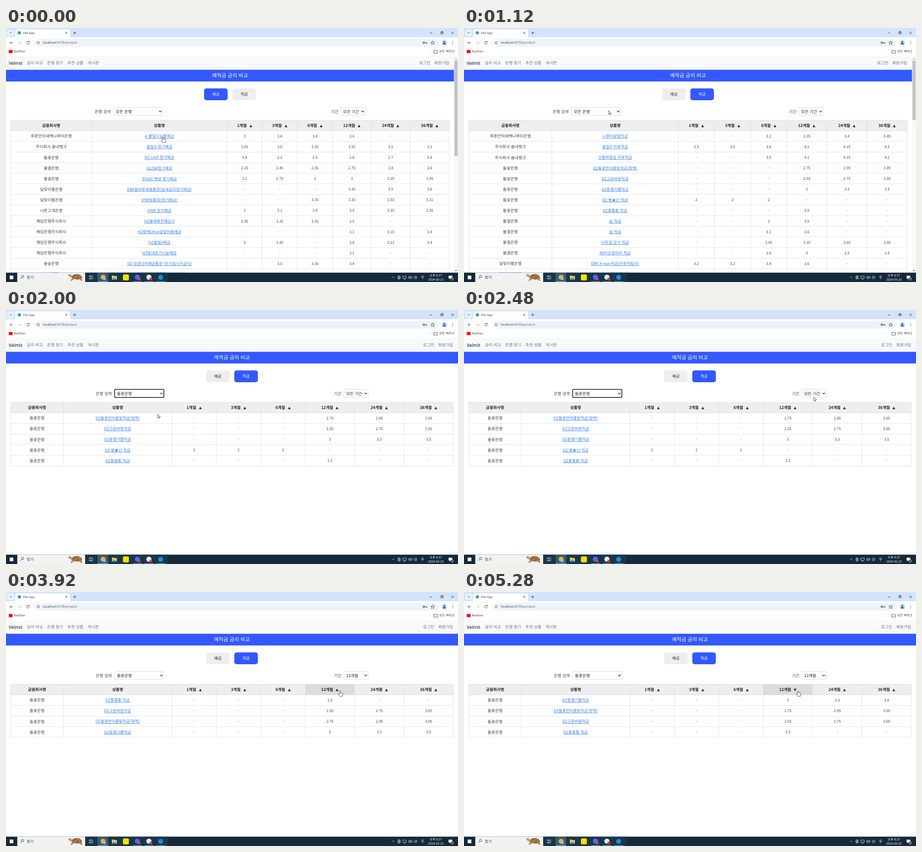
An HTML page that plays this animation: 982 by 552 pixels, repeating every 5360 ms.

```html
<!DOCTYPE html>
<html lang="ko">
<head>
<meta charset="utf-8">
<title>예적금 금리 비교</title>
<style>
html, body { margin: 0; width: 100%; height: 100%; overflow: hidden; background: #fff; }
svg { display: block; width: 982px; height: 552px; }
text { font-family: "Noto Sans CJK KR", "Noto Sans", sans-serif; text-rendering: geometricPrecision; white-space: pre; }
.ui { font-family: "Noto Sans", "Noto Sans CJK KR", sans-serif; }
.link { text-decoration: underline; text-decoration-thickness: .6px; }
.line { fill: none; stroke: #444; stroke-width: 1; }
</style>
</head>
<body>
<svg viewBox="0 0 982 552">
  <defs><clipPath id="view"><rect y="61" width="982" height="471"/></clipPath></defs>
  <g id="browser"></g>
  <g id="page" clip-path="url(#view)"></g>
  <g id="taskbar"></g>
  <g id="cursor"></g>
</svg>
<script>
const LOOP = 5360, ROW = 23.05, TOP = 200.5, ITEM = 11.27, LIST_TOP = 190.7;
const BLUE = '#3358ff', LINK = '#2f7bea';
const $ = id => document.getElementById(id);

const banks = ('모든 은행,푸른언덕새벽나루터은행,주식회사 솔내뱅크,들꽃은행,물결은행,달맞이별은행,너른고개은행,솔숲은행,' +
  '주식회사 도토리뱅크,해담은행주식회사,윤슬뱅크 주식회사,갯돌은행,참빛은행,여울은행,구름은행,안개은행,노을은행,이슬은행,버들은행').split(',');
const months = ['1개월', '3개월', '6개월', '12개월', '24개월', '36개월'];
const periods = ['모든 기간', ...months];

const parse = list => list.trim().split('\n').map(line => {
  const [bank, name, rates] = line.split('|');
  return { bank: banks[bank], name, rates: rates.split(' ') };
});

const deposits = parse(`
1|e-풀잎디딤돌예금|3 3.4 3.4 3.4 - -
2|솔잎Q 정기예금|3.05 3.5 3.55 3.55 3.2 3.2
3|DZ Leaf 정기예금|1.8 2.2 2.3 2.6 2.7 2.8
4|GLOW정기예금|2.25 2.45 2.55 2.75 2.8 2.8
4|온(All) 햇살 정기예금|2.2 2.75 3 3 3.25 1.95
5|DBY들마루새봄통장(실세금리정기예금)|- - - 3.45 3.5 3.6
5|3색9빛통장(정기예금)|- - 3.33 3.33 3.33 3.31
6|QNR 정기예금|3 3.1 3.4 3.5 3.35 3.35
9|HZ물레회전예금 II|2.95 3.35 3.35 3.5 - -
9|HZ함께Olive갈잎마을예금|- - - 3.1 3.15 3.4
9|HZ봄빛e예금|3 3.45 - 3.6 3.23 3.4
9|HZ동네온기나눔예금|- - - 3.1 - -
7|SQ 징검다리예금통장 (만기일시지급식)|- 3.5 3.55 3.4 - -
7|SQ 징검다리예금통장 (이자지급식)|- - - 3.4 - -`);

const savings = parse(`
1|나루터살림적금|- - 3.1 3.35 3.4 3.45
2|솔잎Q 자유적금|3.3 3.5 3.6 4.2 4.25 4.3
2|산들바람길 자유적금|- - 3.5 4.1 4.15 4.2
3|DZ들꽃한아름빛적금(정액)|- - - 2.75 2.95 3.05
3|DZ고운바람적금|- - - 2.55 2.75 3.05
3|DZ동행기쁨적금|- - - 3 3.3 3.5
3|DZ 별★난 적금|2 2 2 - - -
3|DZ통통통 적금|- - - 2.5 - -
4|숲 적금|- - 3 3.5 - -
4|숲 적금|- - 3.1 3.6 - -
4|나무길 걷기 적금|- - 3.05 3.35 3.05 3.05
4|MQY손길따라 적금|- - 2.9 3 2.5 2.5
5|DBY A-way적금(자유적립식)|3.2 3.2 3.4 3.6 - -
5|DBY A-way적금(정액적립식)|3.2 3.2 3.4 3.6 - -`);

const columns = {
  deposit: [10.5, 186, 480.5, 556.5, 633, 709.5, 793.5, 878, 963],
  saving: [10.5, 191, 465.5, 544, 623, 701, 788.5, 875.5, 963],
  filtered: [10.5, 124.5, 360.5, 457, 553.5, 650.5, 757, 865, 971.5]
};

// Pointer tip: time, x, y
const path = [[0, 341.5, 237], [80, 341.5, 237], [560, 506, 150], [820, 506, 150], [1200, 290, 183],
  [1360, 290, 183], [1540, 288, 205], [1640, 288, 205], [1780, 286, 230], [1900, 286, 230],
  [2440, 760, 189], [2520, 760, 189], [2600, 759, 184], [2720, 759, 184], [2960, 758, 242],
  [3160, 758, 242], [3600, 726, 215], [LOOP, 726, 215]];

const rect = (x, y, w, h, fill, more = '') => `<rect x="${x}" y="${y}" width="${w}" height="${h}" fill="${fill}" ${more}/>`;
const circle = (x, y, r, fill, more = '') => `<circle cx="${x}" cy="${y}" r="${r}" fill="${fill}" ${more}/>`;
const stroke = (d, color = '#444', width = 1) => `<path class="line" d="${d}" style="stroke:${color};stroke-width:${width}"/>`;
const shape = (d, fill) => `<path d="${d}" fill="${fill}"/>`;
// y is the visual middle of the text
const text = (s, x, y, { size = 8.8, fill = '#3c3f42', anchor = 'start', more = '' } = {}) =>
  `<text x="${x}" y="${y + size * .36}" font-size="${size}" fill="${fill}" text-anchor="${anchor}" ${more}>${s}</text>`;
const middle = (s, x, y, opts) => text(s, x, y, { anchor: 'middle', ...opts });
const ui = 'class="ui"';

function pointer(t) {
  const i = Math.max(1, path.findIndex(p => p[0] > t));
  const [a, b] = [path[i - 1], path[i]];
  const u = (t - a[0]) / (b[0] - a[0]), e = u * u * (3 - 2 * u);
  return { x: a[1] + (b[1] - a[1]) * e, y: a[2] + (b[2] - a[2]) * e };
}

function stateAt(t) {
  const p = pointer(t);
  const s = {
    saving: t >= 720,
    bank: t >= 1840 ? 3 : 0,
    period: t >= 3040 ? 4 : 0,
    open: t >= 1280 && t < 1840 ? 'bank' : t >= 2640 && t < 3040 ? 'period' : '',
    focus: t >= 1840 && t < 2640 ? 'bank' : t >= 3040 && t < 3680 ? 'period' : '',
    sort: t >= 4560 ? -1 : t >= 3680 ? 1 : 0
  };
  s.layout = s.bank ? 'filtered' : s.saving ? 'saving' : 'deposit';
  const cols = columns[s.layout];
  const inHead = !s.open && p.y > TOP && p.y < TOP + ROW;
  s.hover = inHead ? cols.findIndex((x, i) => i > 1 && p.x >= x && p.x < cols[i + 1]) : -1;
  s.item = s.open ? Math.max(0, Math.floor((p.y - LIST_TOP) / ITEM)) : 0;
  return s;
}

function selectBox(x, w, label, focused) {
  const edge = focused ? 'stroke="#111" stroke-width="1.5"' : 'stroke="#cfd2d6" stroke-width=".8"';
  return rect(x, 172.5, w, 17.5, '#fff', `rx="2" ${edge}`) + text(label, x + 5, 181.4, { fill: '#222' }) +
    stroke(`M${x + w - 8} 180l2.6 2.7 2.6-2.7`, '#222', 1.2);
}

function optionList(x, w, options, active) {
  return rect(x, 190.5, w, options.length * ITEM + .8, '#fff', 'stroke="#777" stroke-width=".9"') +
    options.map((label, i) => {
      const y = LIST_TOP + i * ITEM, on = i === active;
      return (on ? rect(x + .5, y + .2, w - 1, ITEM, '#0f5fcb') : '') +
        text(label, x + 5, y + 5.7, { fill: on ? '#fff' : '#222' });
    }).join('');
}

function visibleRows(s) {
  let rows = s.saving ? savings : deposits;
  if (s.bank) rows = rows.filter(r => r.bank === banks[s.bank]);
  if (s.period) rows = rows.filter(r => r.rates[s.period - 1] !== '-');
  return s.sort ? [...rows].sort((a, b) => s.sort * (a.rates[3] - b.rates[3])) : rows;
}

function table(s) {
  const cols = columns[s.layout], rows = visibleRows(s);
  const left = cols[0], right = cols[8], bottom = TOP + ROW * (rows.length + 1);
  const mid = i => (cols[i] + cols[i + 1]) / 2;
  const headY = TOP + ROW / 2 + .3, bold = { fill: '#222', more: 'font-weight="700"', size: 8.6 };
  let out = rect(left, TOP, right - left, ROW, '#eeeeee');
  if (s.hover > 1) out += rect(cols[s.hover], TOP, cols[s.hover + 1] - cols[s.hover], ROW, '#dcdcdc');
  out += middle('금융회사명', mid(0), headY, bold) + middle('상품명', mid(1), headY, bold);
  months.forEach((m, i) => {
    const c = mid(i + 2), ax = c + (m.length > 3 ? 15.5 : 13.5);
    const down = i === 3 && s.sort < 0;
    out += middle(m, c - 6, headY, bold) +
      shape(down ? `M${ax - 3} 210.3h6l-3 5.2z` : `M${ax - 3} 215.5h6l-3-5.2z`, '#222');
  });
  rows.forEach((r, i) => {
    const y = TOP + ROW * (i + 1.5) + .2;
    out += middle(r.bank, mid(0), y) + middle(r.name, mid(1), y, { fill: LINK, more: 'class="link"', size: 8.6 }) +
      r.rates.map((v, k) => middle(v, mid(k + 2), y, { size: 7.9 })).join('');
  });
  let grid = cols.map(x => `M${x} ${TOP}V${bottom}`).join('');
  for (let i = 0; i <= rows.length + 1; i++) grid += `M${left} ${TOP + i * ROW}H${right}`;
  return out + stroke(grid, '#dadcdf', .8);
}

function scrollbar(end) {
  return rect(973.5, 61, 8.5, 471, '#f8f8f8') + rect(974.3, 71, 6.8, end - 71, '#c1c1c1') +
    shape('M975.5 68.5h4.4l-2.2-2.6z', '#888') + shape('M975.5 526h4.4l-2.2 2.6z', '#555');
}

function page(s) {
  const scroll = !s.bank, width = scroll ? 973.5 : 982, cx = width / 2;
  const bankX = scroll ? 233.5 : 236, periodX = scroll ? 727.3 : 734;
  const grey = { fill: '#6c6f72' };
  const tab = (x, label, on) => rect(x, 131.3, 51.2, 25.7, on ? BLUE : '#eeeeee', 'rx="5"') +
    middle(label, x + 25.6, 144.3, { fill: on ? '#fff' : '#222', size: 8.6 });
  return rect(0, 61, width, 30, '#f8f9fa') +
    text('Velmit', 6, 76.6, { size: 10, fill: '#111', more: ui }) +
    ['금리 비교', '은행 찾기', '추천 상품', '게시판'].map((m, i) => text(m, 45.3 + i * 44, 76.3, grey)).join('') +
    text('로그인', width - 76, 76.3, grey) + text('회원가입', width - 43, 76.3, grey) +
    rect(0, 90.8, width, 25.4, BLUE) + middle('예적금 금리 비교', cx, 103.4, { size: 11.2, fill: '#fff' }) +
    tab(cx - 56.4, '예금', !s.saving) + tab(cx + 5, '적금', s.saving) +
    text('은행 검색', bankX - 41, 181.6) + selectBox(bankX, 107, banks[s.bank], s.focus === 'bank') +
    text('기간', periodX - 21.5, 181.6) + selectBox(periodX, 53, periods[s.period], s.focus === 'period') +
    table(s) + (scroll ? scrollbar(s.saving ? 200 : 278) : '') +
    (s.open === 'bank' ? optionList(bankX, 107, banks, s.item) : '') +
    (s.open === 'period' ? optionList(periodX, 53, periods, s.item) : '');
}

function browser() {
  return rect(0, 0, 982, 61.5, '#fff') + rect(0, 0, 982, 20, '#d3e3fd') +
    rect(2.5, 3, 15, 14.5, '#e8f0fe', 'rx="4"') + stroke('M8.2 9.3l2 2 2-2', '#333') +
    shape('M16 20.5q4 0 4-4V7q0-4 4-4h111q4 0 4 4v9.5q0 4 4 4z', '#fff') +
    circle(29, 10.5, 3.6, '#35a98a') + text('Vite App', 36.5, 11, { size: 6.5, more: ui }) +
    stroke('M128.7 8.3l4.4 4.4m0-4.4l-4.4 4.4M149.2 7.5v6M146.2 10.5h6', '#333', .9) +
    stroke('M921 10.8h5M944.5 9h3.8v3.8h-3.8zM945.6 9V7.8h4v4h-1.2M967.6 8l5 5m0-5l-5 5', '#222', .8) +
    stroke('M14.5 32H8.6m2.7-2.8L8.5 32l2.8 2.8') + stroke('M27 32h5.9m-2.7-2.8L33 32l-2.8 2.8', '#b5b8bc') +
    stroke('M50.3 30a3 3 0 1 0 .5 2.7M50.8 28.3v2.2h-2.3') +
    rect(62, 23.8, 877, 16.4, '#eef2fa', 'rx="8.2"') + circle(70, 32, 6, '#fff') +
    stroke('M73 32a3 3 0 1 1-6 0a3 3 0 1 1 6 0M70 31.6v2M70 30v.8', '#444', .8) +
    text('localhost:5173<tspan fill="#666">/product</tspan>', 80, 32, { size: 6.9, more: ui }) +
    stroke('M909.5 32a1.9 1.9 0 1 1-3.8 0a1.9 1.9 0 1 1 3.8 0M909.5 32h5v2M912.4 32v1.6', '#444', 1.1) +
    stroke('M927 28l1.2 2.7 2.9.2-2.2 1.9.7 2.9-2.6-1.6-2.6 1.6.7-2.9-2.2-1.9 2.9-.2z', '#444', .9) +
    circle(952.3, 32, 6.5, '#d3e3fd') + circle(952.3, 30.2, 1.9, '#1a56c4') +
    shape('M948.6 35.6q0-3 3.7-3t3.7 3z', '#1a56c4') +
    [29, 32, 35].map(y => circle(970.5, y, .8, '#444')).join('') +
    rect(6, 47.7, 8.4, 6.8, '#f00', 'rx="1"') + text('ReelDen', 17, 51, { size: 6.4, more: ui }) +
    stroke('M921 47.5v7', '#d3e3fd') + stroke('M929.7 48.3h3l1 1.2h3.9v5h-7.9z', '#444', .9) +
    text('모든 북마크', 941, 51, { size: 6.8 });
}

function taskbar() {
  const white = { size: 6.6, fill: '#fff' };
  const badge = x => circle(x, 545.5, 3, '#e23b3b');
  return rect(0, 531.7, 982, 20.3, '#14293a') + rect(173, 531.7, 180, 20.3, '#18364a') +
    rect(8, 538, 8, 8, '#fff') + rect(24.5, 532, 147.5, 20, '#f1f2f3') +
    stroke('M38.6 540a2.5 2.5 0 1 1-5 0a2.5 2.5 0 1 1 5 0M34.3 542l-3 3.3', '#333', .9) +
    text('찾기', 45, 542.2, { size: 8.4 }) +
    shape('M141 541q8-9 19-5q6 4 5 8q-7 4-15 2q-7-2-9-5z', '#94653a') +
    shape('M145 540l-5-5q-4-1-5 2q1 4 8 5z', '#c59a62') +
    shape('M148 544q-2 5-8 6q2-5 4-7zM158 545q3 4 8 5q0-4-3-6z', '#b98548') +
    stroke('M147 540l5 2 4-5M152 542l1 4M156 537l5 3-1 5', '#d9b27a', .8) +
    stroke('M181 538.5h5v2h-5zM181 543.5h5v2h-5zM188.3 538v8', '#e4eaef', .8) +
    rect(199, 532, 23, 20, '#3f5a6c') + circle(211, 541.5, 5.3, '#e9b23a') + circle(214, 545, 3, '#8bb8f5') +
    shape('M230 538h4l1 1h6v7.5h-11z', '#f5c64c') + rect(232, 543, 7, 3.5, '#4a9be0') +
    rect(254, 535.5, 13, 13, '#fae100', 'rx="3"') +
    circle(285.5, 541.5, 5.6, '#5865f2') + badge(289.5) +
    circle(310.5, 541.5, 5.6, '#e8edf2') + badge(314.5) + circle(336, 542, 5.4, '#2489d8') +
    rect(199, 550.8, 23, 1.2, '#76b9ed') +
    [276, 301, 326].map(x => rect(x, 550.8, 20, 1.2, '#76b9ed')).join('') +
    stroke('M838.3 543.3l2.9-2.9 2.9 2.9M851.5 539h5v6h-5zM854 537.5v9M851.5 542h5', '#e4eaef', .8) +
    stroke('M862 539h7.5v5H862zM864 546h4M874.5 540.6h1.6l2-1.8v6.6l-2-1.8h-1.6zM879.8 540.3q1.2 1.8 0 3.6M881.4 539q2 3 0 6', '#e4eaef', .8) +
    stroke('M893 542a3.1 3.1 0 1 1-6.2 0a3.1 3.1 0 1 1 6.2 0M888.6 540.7l2.6 2.6m0-2.6l-2.6 2.6', '#c9d2d8', .8) +
    stroke('M902.5 539h5M901.8 541.7h6.4M905 541.7v4', '#fff', .8) +
    middle('오후 8:37', 934, 537.6, white) + middle('2024-05-23', 934, 546.9, white) +
    shape('M961.5 538.2h8v6h-4l-2 2v-2h-2z', '#fff') + circle(969.3, 545.3, 3, '#2b3d49', 'stroke="#fff" stroke-width=".6"') +
    middle('7', 969.3, 545.3, { size: 4.5, fill: '#fff' });
}

const HAND = 'M-1.1 1.2Q-1.1 0 0 0T1.1 1.2V4.2L4.6 4.9Q6 5.3 5.8 6.9L5 11.6H-1L-4 7.3Q-4.2 5.9-2.9 6.1L-1.1 7.4Z';
const ARROW = 'M0 0V8.3L1.9 6.6 3.1 9.3 4.4 8.7 3.2 6.1H5.7Z';

function isHand(t, p, s) {
  const onLink = t < 180;
  const onTab = p.y > 131 && p.y < 157 && p.x > 430 && p.x < 547;
  return onLink || onTab || s.hover > 1;
}

let shown = '';
function draw(t) {
  const s = stateAt(t), p = pointer(t), key = JSON.stringify(s);
  if (key !== shown) {
    $('page').innerHTML = page(s);
    shown = key;
  }
  $('cursor').innerHTML = `<path d="${isHand(t, p, s) ? HAND : ARROW}" transform="translate(${p.x} ${p.y})"
    fill="#fff" stroke="#333" stroke-width=".8" stroke-linejoin="round"/>`;
}

$('browser').innerHTML = browser();
$('taskbar').innerHTML = taskbar();
const start = performance.now();
function tick() {
  draw((performance.now() - start) % LOOP);
  requestAnimationFrame(tick);
}
tick();
</script>
</body>
</html>
```
